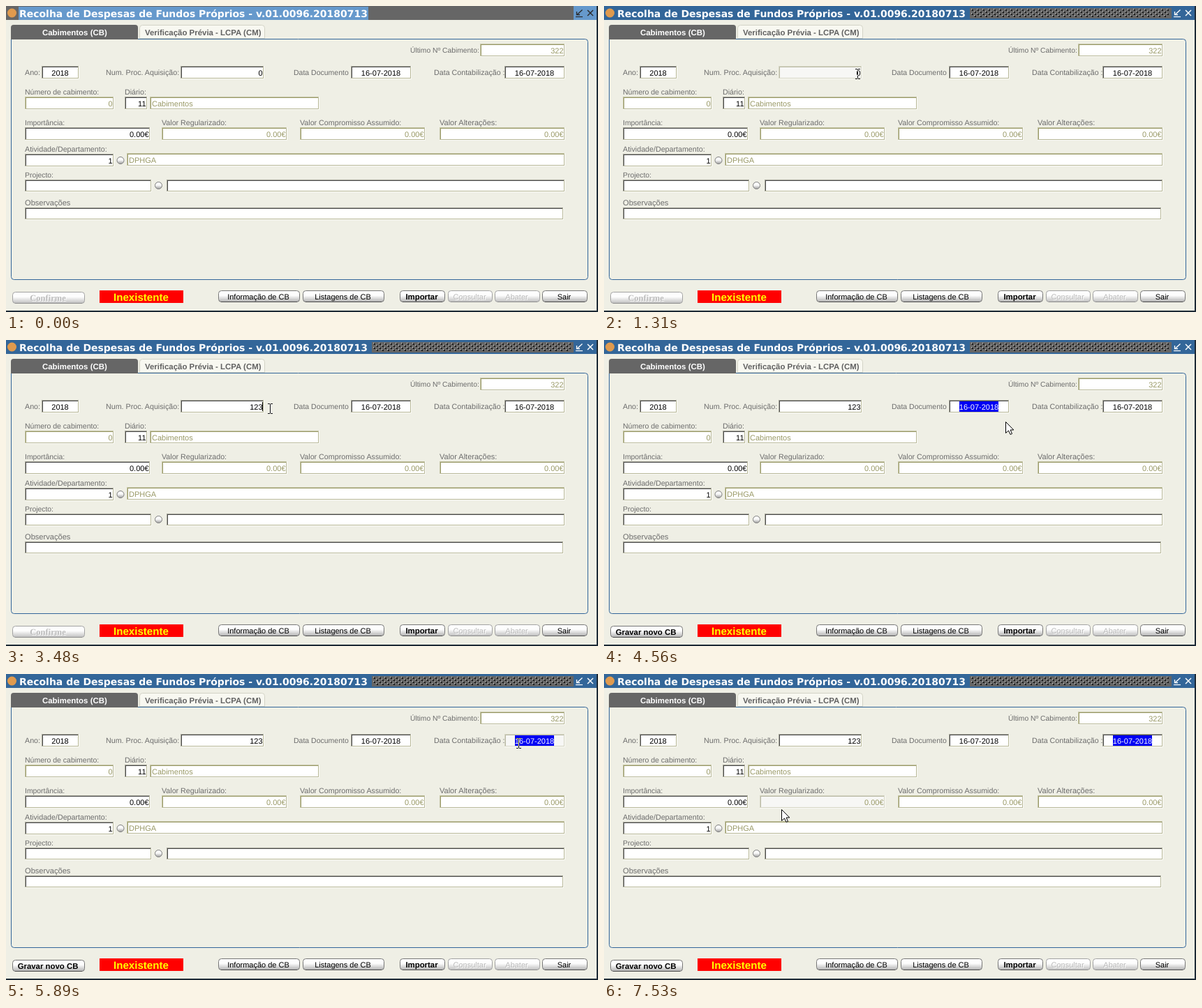
An HTML page with a canvas for the animation above (8 s loop, 848 by 439 pixels).

```html
<!DOCTYPE html>
<html lang="pt">
<head>
<meta charset="utf-8">
<title>Recolha de Despesas</title>
<style>
html, body { margin: 0; width: 100%; height: 100%; overflow: hidden; background: #efefe5; }
canvas { display: block; width: 848px; height: 439px; }
</style>
</head>
<body>
<canvas id="stage" width="848" height="439"></canvas>
<script>
const ctx = document.getElementById('stage').getContext('2d');
const LOOP = 8000;
const SANS = '"Liberation Sans", Arial, sans-serif';
const BLUE = '#336699', PALE_BLUE = '#6699cc', GREY = '#666666', PAPER = '#efefe5', OLIVE = '#999966';

// start, end, number of steps, from x, y, to x, y
const moves = [
  [120, 670, 8, 724, 426, 379, 113],
  [750, 900, 3, 379, 113, 363, 97],
  [1380, 1530, 3, 363, 97, 378, 98],
  [4250, 4405, 3, 378, 98, 520, 99],
  [4483, 4560, 2, 520, 99, 575, 117],
  [5490, 5890, 6, 575, 117, 734, 99],
  [6730, 7530, 11, 734, 99, 254, 194]
];

const labels = [
  ['Último Nº Cabimento:', 579, 67, 10.3],
  ['Ano:', 27, 99], ['Num. Proc. Aquisição:', 143, 99],
  ['Data Documento', 412, 99, 10.5], ['Data Contabilização :', 613, 99],
  ['Número de cabimento:', 27, 127, 10.5], ['Diário:', 170, 127],
  ['Importância:', 27, 171, 10.4], ['Valor Regularizado:', 223, 171],
  ['Valor Compromisso Assumido:', 421, 171], ['Valor Alterações:', 621, 171, 11],
  ['Atividade/Departamento:', 27, 209], ['Projecto:', 27, 246, 10.4],
  ['Observações', 27, 286, 11.1]
];

function field(x, y, x2, y2, text, align, on, hot) {
  return { x, y, x2, y2, text, align, on, hot };
}
const num = field(250, 87, 369, 104, '0', 'right', true, true);
const docDate = field(494, 87, 580, 104, '16-07-2018', 'center', true, true);
const accDate = field(714, 87, 800, 104, '16-07-2018', 'center', true, true);
const fields = [
  field(679, 55, 800, 72, '322', 'right', false, false),
  field(51, 87, 104, 104, '2018', 'center', true, true),
  num, docDate, accDate,
  field(27, 131, 154, 148, '0', 'right', false, true),
  field(170, 131, 202, 148, '11', 'right', true, true),
  field(206, 131, 448, 148, 'Cabimentos', 'left', false, true),
  field(27, 175, 206, 192, '0.00€', 'right', true, true),
  field(223, 175, 402, 192, '0.00€', 'right', false, true),
  field(421, 175, 600, 192, '0.00€', 'right', false, true),
  field(621, 175, 800, 192, '0.00€', 'right', false, true),
  field(27, 213, 154, 230, '1', 'right', true, false),
  field(173, 212, 800, 229, 'DPHGA', 'left', false, false),
  field(27, 250, 208, 266, '', 'left', true, false),
  field(230, 250, 800, 266, '', 'left', true, false),
  field(27, 290, 798, 306, '', 'left', true, false)
];

function rect(x, y, w, h, color) {
  ctx.fillStyle = color;
  ctx.fillRect(x, y, w, h);
}

function write(text, x, y, font, color, align = 'left') {
  ctx.font = font;
  ctx.textAlign = align;
  ctx.fillStyle = color;
  ctx.fillText(text, x, y);
}

function rounded(x, y, w, h, r, fill, stroke) {
  ctx.beginPath();
  ctx.roundRect(x, y, w, h, r);
  if (fill) { ctx.fillStyle = fill; ctx.fill(); }
  if (stroke) { ctx.strokeStyle = stroke; ctx.lineWidth = 1; ctx.stroke(); }
}

function polyline(points, color, width) {
  ctx.beginPath();
  points.forEach(([x, y]) => ctx.lineTo(x, y));
  ctx.strokeStyle = color;
  ctx.lineWidth = width;
  ctx.stroke();
}

function shade(y, h, top, bottom) {
  const g = ctx.createLinearGradient(0, y, 0, y + h);
  g.addColorStop(0, top);
  g.addColorStop(0.45, top);
  g.addColorStop(1, bottom);
  return g;
}

function drawTitle(active) {
  rect(0, 0, 846, 20, active ? BLUE : GREY);
  if (active) {
    rect(524, 3, 289, 15, GREY);
    for (let row = 0; row < 4; row++) {
      for (let x = 526 + (row % 2) * 4; x < 810; x += 8) {
        rect(x + 1, 5 + row * 3, 2, 2, '#1c1c1c');
        rect(x, 4 + row * 3, 1, 1, '#e0e0e0');
      }
    }
  } else {
    rect(18, 1, 501, 19, PALE_BLUE);
    rect(813, 0, 33, 20, PALE_BLUE);
  }
  ctx.beginPath();
  ctx.arc(8.5, 10, 6.5, 0, Math.PI * 2);
  ctx.fillStyle = '#e09a4e';
  ctx.fill();
  write('Recolha de Despesas de Fundos Próprios - v.01.0096.20180713', 19, 16,
    'bold 13.97px "DejaVu Sans", Verdana, sans-serif', '#ffffff');
  const ink = active ? '#ffffff' : '#2b2b2b';
  polyline([[825.5, 5.5], [818, 12.5]], ink, 1.3);
  polyline([[817.5, 8], [817.5, 12.5], [822, 12.5]], ink, 1.3);
  polyline([[816, 15.5], [826, 15.5]], ink, 1.2);
  polyline([[833, 6], [841, 14]], ink, 1.5);
  polyline([[841, 6], [833, 14]], ink, 1.5);
}

function drawPanel() {
  rounded(7.5, 47.5, 826, 345, [0, 4, 4, 4], null, BLUE);
  rounded(191.5, 27.5, 179, 19, [4, 4, 0, 0], '#f8f8f1', '#d3d3c6');
  rounded(7, 27, 182, 21, [4, 4, 0, 0], GREY);
  const font = `bold 11.45px ${SANS}`;
  write('Cabimentos (CB)', 52, 42, font, '#ffffff');
  write('Verificação Prévia - LCPA (CM)', 199, 42, font, '#626262');
  rect(0, 437, 848, 2, '#1d2a36');
  rect(846, 0, 2, 439, '#1d2a36');
}

function drawField(f, text, hovered, selected) {
  const w = f.x2 - f.x, h = f.y2 - f.y;
  const outer = hovered ? '#d6d6c4' : f.on ? '#a8a89c' : '#c6c6a8';
  const inner = hovered ? '#b9b9a4' : f.on ? '#4a4a4a' : OLIVE;
  const light = hovered ? '#d6d6c4' : '#b8b898';
  rect(f.x, f.y - 1, w + 1, h + 2, '#fafaf6');
  rect(f.x, f.y - 1, w, 1, outer);
  rect(f.x, f.y - 1, 1, h + 1, outer);
  rect(f.x + 1, f.y, w - 1, h, hovered ? '#f7f7f5' : '#ffffff');
  rect(f.x + 1, f.y + h - 1, w - 1, 1, light);
  rect(f.x + w - 1, f.y, 1, h, light);
  rect(f.x + 1, f.y, w - 2, 1, inner);
  rect(f.x + 1, f.y, 1, h - 1, inner);
  if (!text) return;

  ctx.font = `11px ${SANS}`;
  const tw = ctx.measureText(text).width;
  const left = f.align === 'left' ? f.x + 3
    : f.align === 'right' ? f.x2 - 1.5 - tw
    : (f.x + f.x2 - tw) / 2;
  if (selected) rect(Math.round(left), 88, Math.round(tw), 15, '#0000f4');
  write(text, left, f.y + 13, ctx.font, selected ? '#ffffff' : f.on ? '#000000' : OLIVE);
}

function drawKnob(x, y) {
  ctx.beginPath();
  ctx.arc(x, y, 5, 0, Math.PI * 2);
  ctx.fillStyle = shade(y - 5, 10, '#fafafa', '#9c9c9c');
  ctx.fill();
  ctx.strokeStyle = '#7d7d7d';
  ctx.lineWidth = 1;
  ctx.stroke();
}

function drawButton(x, y, w, text, on, font) {
  rounded(x + 0.5, y + 0.5, w - 1, 16, 4,
    shade(y, 16, '#fdfdfd', on ? '#b5b5b5' : '#c2c2c2'), on ? '#777777' : '#a2a2a2');
  polyline([[x + 4, y + 16.5], [x + w - 4, y + 16.5]], on ? '#4c4c4c' : '#8c8c8c', 1);
  const cx = x + w / 2 - 1;
  if (!on) write(text, cx + 1, y + 14, font, '#ffffff', 'center');
  write(text, cx, y + 13, font, on ? '#000000' : '#bcbcbc', 'center');
}

function drawButtons(t) {
  const plain = `11px ${SANS}`, bold = `bold 11.4px ${SANS}`;
  if (t < 3870) drawButton(9, 410, 104, 'Confirme', false, 'bold 12.5px "Liberation Serif", "Times New Roman", serif');
  else drawButton(9, 410, 104, 'Gravar novo CB', true, bold);
  rect(134, 408, 120, 18, '#ff0000');
  write('Inexistente', 154, 423, `bold 15.1px ${SANS}`, '#ffff00');
  drawButton(304, 408, 117, 'Informação de CB', true, plain);
  drawButton(425, 408, 117, 'Listagens de CB', true, plain);
  drawButton(564, 408, 65, 'Importar', true, bold);
  drawButton(633, 408, 64, 'Consultar', false, plain);
  drawButton(700, 408, 65, 'Abater', false, plain);
  drawButton(768, 408, 65, 'Sair', true, plain);
}

function cursorAt(t) {
  let pos = null;
  for (const [start, end, n, x0, y0, x1, y1] of moves) {
    if (t < start) break;
    const done = Math.min(1, (t - start) / (end - start));
    const p = (1 + Math.floor(done * (n - 1) + 1e-6)) / n;
    const s = p * p * (3 - 2 * p);
    pos = { x: Math.round(x0 + (x1 - x0) * s), y: Math.round(y0 + (y1 - y0) * s) };
  }
  return pos;
}

function drawArrow({ x, y }) {
  const shape = [[0, 0], [0, 16], [4, 12.5], [6.5, 18], [9, 17], [6.6, 11.5], [11.3, 11.5]];
  ctx.beginPath();
  shape.forEach(([dx, dy]) => ctx.lineTo(x + 0.5 + dx, y + 0.5 + dy));
  ctx.closePath();
  ctx.fillStyle = '#ffffff';
  ctx.fill();
  ctx.strokeStyle = '#000000';
  ctx.lineWidth = 1;
  ctx.stroke();
}

function drawBeam({ x, y }) {
  ctx.globalCompositeOperation = 'difference';
  rect(x, y - 6, 1, 13, '#ffffff');
  for (const dy of [-7, 7]) {
    rect(x - 3, y + dy, 3, 1, '#ffffff');
    rect(x + 1, y + dy, 3, 1, '#ffffff');
  }
  ctx.globalCompositeOperation = 'source-over';
}

function isOver(f, p) {
  const m = 5;
  return f.hot && p && p.x > f.x - m && p.x < f.x2 + m && p.y > f.y - m && p.y < f.y2 + m;
}

function draw(t) {
  const cursor = cursorAt(t);
  const typed = t < 2390 ? '0' : t < 2610 ? '1' : t < 2870 ? '12' : '123';
  const selected = t < 1380 ? null : t < 2390 ? num
    : t < 3790 ? null : t < 5180 ? docDate : accDate;

  ctx.textRendering = 'geometricPrecision';
  rect(0, 0, 848, 439, PAPER);
  drawTitle(t >= 980);
  drawPanel();
  for (const [text, x, y, size = 10.7] of labels) write(text, x, y, `${size}px ${SANS}`, '#6c6c6c');
  for (const f of fields) drawField(f, f === num ? typed : f.text, isOver(f, cursor), f === selected);
  if (t >= 3480 && t < 3790) rect(367, 89, 1, 13, '#000000');
  drawKnob(164, 221.5);
  drawKnob(218.5, 257.5);
  drawButtons(t);
  if (cursor) (cursor.y < 106 ? drawBeam : drawArrow)(cursor);
}

const begin = performance.now();
function tick() {
  draw((performance.now() - begin) % LOOP);
  requestAnimationFrame(tick);
}
tick();
</script>
</body>
</html>
```
